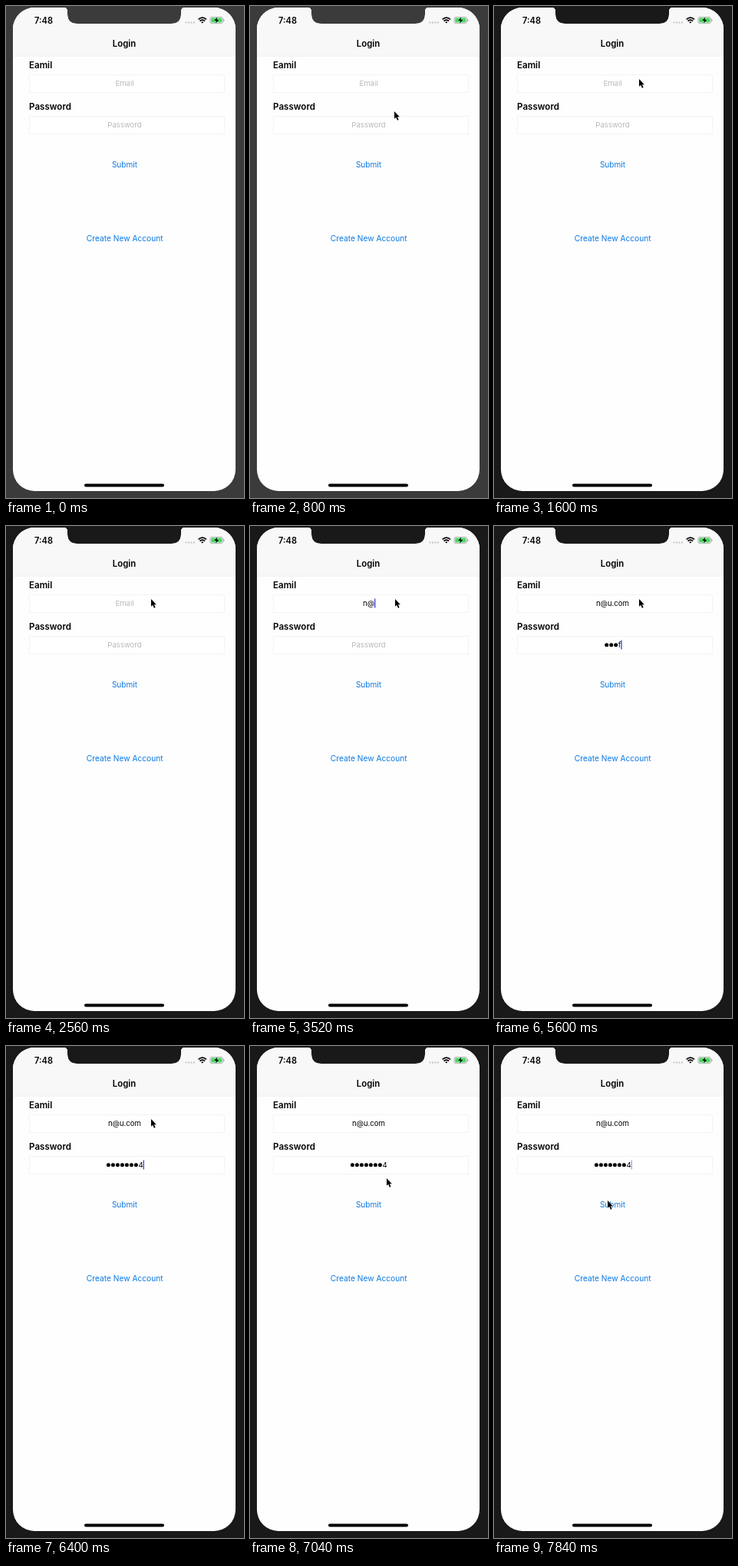
An HTML page for the animation above (8000 ms loop, 310 px wide and 640 px high).

```html
<!DOCTYPE html>
<html lang="en">
<head>
<meta charset="utf-8">
<title>Login form</title>
<style>
  html, body { margin: 0; width: 100%; height: 100%; overflow: hidden; background: #191919; }
  svg { display: block; width: 310px; height: 640px; font: 9.6px Inter, "Liberation Sans", sans-serif; }
  .bold { font-size: 11.6px; font-weight: 600; }
  .mid { text-anchor: middle; }
  .link { font-size: 10.1px; fill: #0b78e3; text-anchor: middle; }
  .hint { fill: #b9b9bd; text-anchor: middle; }
  .box { fill: #fff; stroke: #f3f3f3; }
</style>
</head>
<body>
<svg viewBox="0 0 310 640">
  <defs>
    <clipPath id="screen">
      <path d="M37 2H75Q80 2 80 7V10Q80 23 93 23H215Q228 23 228 10V7Q228 2 233 2H271A28 28 0 0 1 299 30V603A28 28 0 0 1 271 631H37A28 28 0 0 1 9 603V30A28 28 0 0 1 37 2Z"/>
    </clipPath>
  </defs>
  <rect id="bezel" width="310" height="640"/>
  <g clip-path="url(#screen)">
    <rect width="310" height="640" fill="#fefefe"/>
    <rect width="310" height="65" fill="#f8f8f8"/>
    <path d="M9 65.25H299" stroke="#dedede" stroke-width=".5"/>
  </g>

  <text class="bold mid" x="49" y="22.5" style="font-size:11.1px">7:48</text>
  <path d="M233.5 21.5H246" stroke="#c4c4c4" stroke-width="1.8" stroke-dasharray="2 1.5"/>
  <g fill="none" stroke="#000" stroke-width="1.7">
    <path d="M250.6 17.4Q255.8 12.8 261 17.4M252.5 19.5Q255.8 16.6 259.1 19.5"/>
    <path d="M254.2 20.9Q255.8 19.7 257.4 20.9L255.8 22.5Z" fill="#000" stroke="none"/>
  </g>
  <rect x="265.9" y="14.4" width="16.6" height="8.2" rx="2.2" fill="none" stroke="#a5a5a5" stroke-width=".8"/>
  <path d="M283.8 17V20" stroke="#a5a5a5" stroke-width="1.1"/>
  <rect x="267.1" y="15.6" width="14.2" height="5.8" rx="1.2" fill="#4fd765"/>
  <path d="M275.2 14.4L271.2 19H274L273.1 22.6L277.2 17.9H274.4Z"/>

  <text class="bold mid" x="154" y="53" style="font-size:11.4px">Login</text>
  <text class="bold" x="30" y="80.5">Eamil</text>
  <text class="bold" x="30" y="135">Password</text>
  <rect class="box" x="30.5" y="89.5" width="254" height="23"/>
  <rect class="box" x="30.5" y="143.5" width="254" height="23"/>
  <text class="hint" id="emailHint" x="154.5" y="104">Email</text>
  <text class="hint" id="passHint" x="154.5" y="158">Password</text>
  <text class="mid" id="email" x="154.5" y="104"></text>
  <g id="dots"></g>
  <text id="lastChar" y="158.3"></text>
  <rect id="caret" width="1.4" height="12" fill="#4650dc"/>
  <text class="link" x="154.5" y="209.5">Submit</text>
  <text class="link" x="154.7" y="305.7" style="font-size:10.2px">Create New Account</text>
  <rect x="102" y="621.5" width="104" height="4" rx="2"/>
  <path id="cursor" d="M0 0V9.8L2.2 7.8L3.9 11.7L5.6 11L3.9 7.2H6.9Z" stroke="#fff" stroke-width=".9" paint-order="stroke"/>
</svg>
<script>
const LOOP = 8000, STEP = 160, CENTER = 154.5, DOT = 6;
const EMAIL = 'n@u.com', PASSWORD = 'asdf1234';
const emailKeys = [3040, 3360, 3680, 3840, 4000, 4160, 4320];
const passKeys = Array.from(PASSWORD, (_, i) => 5120 + i * STEP);
const ACTIVATE = 1280, EMAIL_FOCUS = 1760, PASS_FOCUS = 4480;

// time, x, y
const cursorPath = [
  [320, 275, 365], [480, 252, 300], [640, 211, 200], [800, 188, 137],
  [960, 188, 122], [1120, 189, 95], [6720, 189, 95], [6880, 187, 125],
  [7040, 178, 172], [7200, 162, 190], [7360, 148, 201], [LOOP, 148, 201]
];

const el = id => document.getElementById(id);
const [bezel, emailHint, passHint, email, dots, lastChar, caret, cursor] =
  ['bezel', 'emailHint', 'passHint', 'email', 'dots', 'lastChar', 'caret', 'cursor'].map(el);
const show = (node, on) => node.setAttribute('visibility', on ? 'visible' : 'hidden');
const clamp = v => Math.max(0, Math.min(1, v));

const dotNodes = Array.from({ length: PASSWORD.length - 1 }, () => {
  const dot = document.createElementNS('http://www.w3.org/2000/svg', 'circle');
  dot.setAttribute('r', 2.5);
  dot.setAttribute('cy', 154.8);
  return dots.appendChild(dot);
});

function drawCursor(t) {
  show(cursor, t >= cursorPath[0][0]);
  const next = cursorPath.findIndex(p => p[0] > t);
  if (next < 1) return;
  const [t0, x0, y0] = cursorPath[next - 1], [t1, x1, y1] = cursorPath[next];
  const k = (t - t0) / (t1 - t0);
  cursor.setAttribute('transform', `translate(${x0 + (x1 - x0) * k} ${y0 + (y1 - y0) * k})`);
}

function drawEmail(count) {
  email.textContent = EMAIL.slice(0, count);
  show(emailHint, !count);
  const half = (count ? email : emailHint).getComputedTextLength() / 2;
  return CENTER + (count ? half : -half - 1.5);
}

function drawPassword(count) {
  show(passHint, !count);
  lastChar.textContent = count ? PASSWORD[count - 1] : '';
  const hidden = Math.max(0, count - 1);
  const width = hidden * DOT + lastChar.getComputedTextLength();
  const left = CENTER - width / 2;
  dotNodes.forEach((dot, i) => {
    show(dot, i < hidden);
    dot.setAttribute('cx', left + (i + .5) * DOT);
  });
  lastChar.setAttribute('x', left + hidden * DOT);
  return count ? left + width : CENTER - passHint.getComputedTextLength() / 2 - 1.5;
}

function drawCaret(t, emailX, passX) {
  const inPass = t >= PASS_FOCUS;
  const resets = [EMAIL_FOCUS, ...emailKeys, PASS_FOCUS, ...passKeys].filter(k => k <= t);
  show(caret, resets.length > 0);
  if (!resets.length) return;
  const phase = (t - resets[resets.length - 1]) % 1000 / 1000;
  caret.setAttribute('opacity', clamp((.7 - phase) / .2) + clamp((phase - .85) / .15));
  caret.setAttribute('x', inPass ? passX : emailX);
  caret.setAttribute('y', inPass ? 148.5 : 94.5);
}

function render(t) {
  const typed = keys => keys.filter(k => k <= t).length;
  bezel.setAttribute('fill', t < ACTIVATE ? '#3b3b3b' : '#191919');
  drawCursor(t);
  drawCaret(t, drawEmail(typed(emailKeys)), drawPassword(typed(passKeys)));
}

let start;
function tick(now) {
  start ??= now;
  render(Math.floor((now - start) % LOOP / STEP) * STEP);
  requestAnimationFrame(tick);
}
render(0);
requestAnimationFrame(tick);
</script>
</body>
</html>
```
